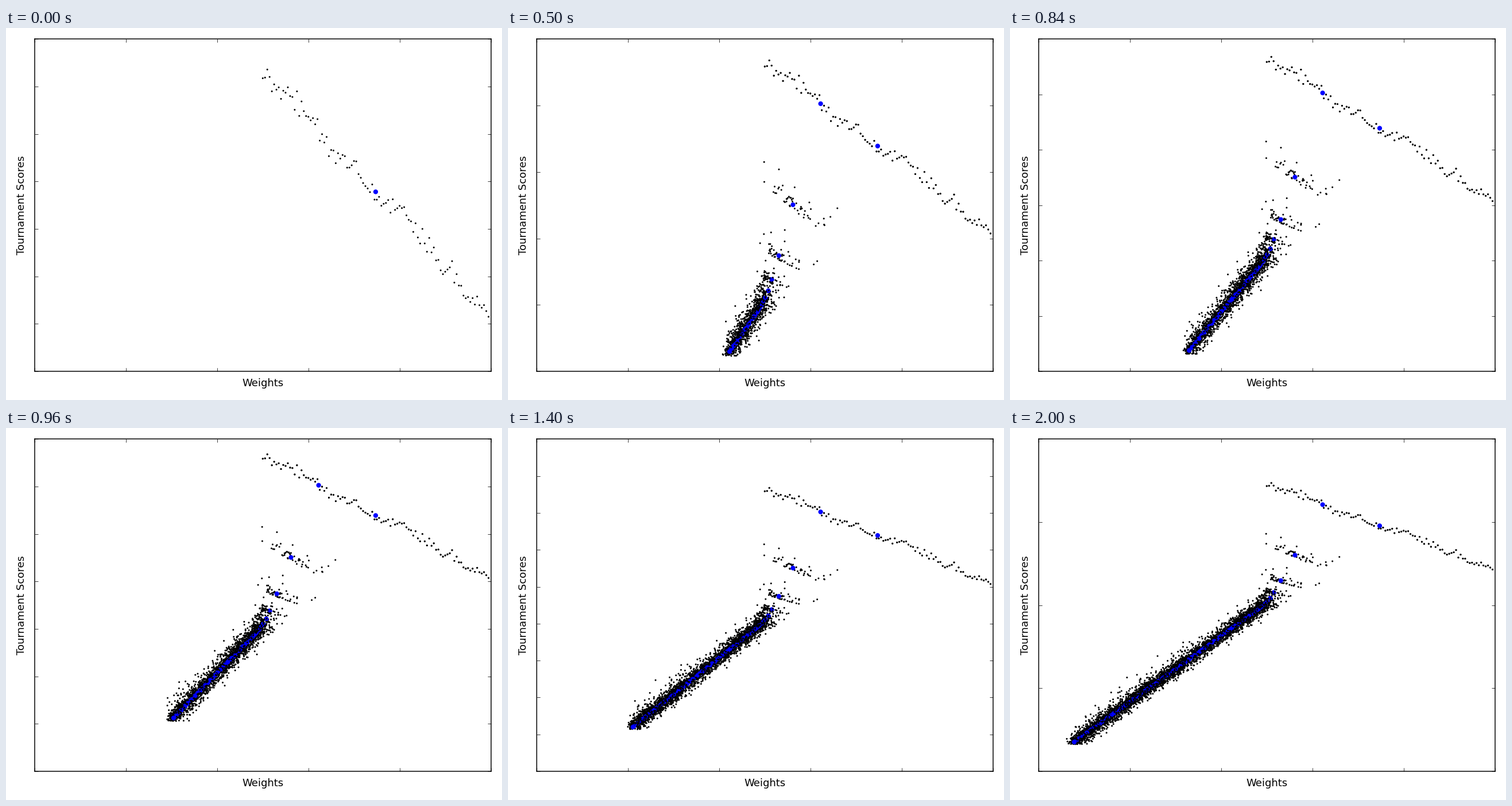
These frames come from a looping animation (864 by 648 pixels, 2020 ms). A matplotlib script:

```python
import math

import matplotlib.pyplot as plt
import numpy as np
from matplotlib.animation import FuncAnimation

W, H, DPI = 864, 648, 108
LEFT, RIGHT, BOTTOM, TOP = 49.94, 844.56, 49.94, 628.56
GENERATIONS = 101
POPULATION = 50

plt.rcParams["font.family"] = "DejaVu Sans"
rng = np.random.default_rng(4)


def first_population():
    """Evenly spaced weights whose scores fall along a bumpy line."""
    weights = .5 + .005 * np.arange(100)
    scores = np.interp(weights, [.5, .6, .665, .705, .74, .81, .85, .995],
                       [7.2, 6.42, 5.5, 5.35, 4.75, 4.4, 3.85, 2.3])
    scores += rng.normal(0, .11, 100)
    scores = 2.15 + 5.21 * (scores - scores.min()) / np.ptp(scores)
    return np.column_stack([weights, scores])


def mean_at(gen):
    """Halves towards 0.5 at first, then drifts down at a steady pace."""
    drift = np.interp(gen, [5, 11, 25, 42, 58, 85, 100],
                      [0, .018, .077, .17, .238, .3526, .422])
    weight = .5 + .2475 / 2 ** gen - drift
    return np.array([weight, 19.8 * weight - 9.78 + 1.67 * .45 ** (gen - 2)])


def offspring(gen):
    spread = .009 + .13 * math.exp(-gen / 1.25)
    slope = -1 - 26 * math.exp(-gen / 2.2)
    drop = .13 + 1.6 * math.exp(-gen / 1.8)
    dx = spread * (rng.gamma(4, 1, POPULATION) - 4) / 2
    dy = slope * dx + rng.exponential(.18, POPULATION) - .13
    dy = np.abs(dy + drop) - drop  # nobody scores below the floor
    return mean_at(gen) + np.column_stack([dx, dy])


def nice_ticks(lo, hi):
    pad = .05 * (hi - lo)
    lo, hi = lo - pad, hi + pad
    for step in (1, 2, 5):
        start = math.floor(lo / step) * step
        if start + 9 * step >= hi:
            break
    return np.arange(start, math.ceil(hi / step) * step + step / 2, step)


first = first_population()
later = range(2, GENERATIONS)
clouds = [first, first] + [offspring(g) for g in later]
means = [first.mean(axis=0), first[:50].mean(axis=0)]
means += [mean_at(g) for g in later]
lows = np.minimum.accumulate([c[:, 1].min() for c in clouds])
best = first[:, 1].max()

# Each generation is its individuals followed by their mean
points = np.vstack([np.vstack(pair) for pair in zip(clouds, means)])
ends = np.cumsum([len(c) + 1 for c in clouds])
sizes = np.full(len(points), 1.0)
sizes[ends - 1] = 20
colors = np.tile([0.0, 0, 0, 1], (len(points), 1))
colors[ends - 1] = 0, 0, 1, 1

fig = plt.figure(figsize=(W / DPI, H / DPI), dpi=DPI, facecolor="white")
ax = fig.add_axes([LEFT / W, BOTTOM / H, (RIGHT - LEFT) / W, (TOP - BOTTOM) / H])
ax.set_xlim(0, 1)
ax.set_xticks(np.arange(0, 1.1, .2))
ax.tick_params(direction="in", length=4, width=.5, top=True, right=True,
               labelleft=False, labelbottom=False)
for spine in ax.spines.values():
    spine.set_linewidth(1)


def label(x, y, text, angle=0):
    fig.text(x / W, y / H, text, fontsize=12, rotation=angle,
             rotation_mode="anchor", ha="center", va="baseline")


label((LEFT + RIGHT) / 2, 23.6, "Weights")
label(32.5, (BOTTOM + TOP) / 2, "Tournament Scores", 90)

dots = ax.scatter(points[:, 0], points[:, 1], s=sizes, c=colors, linewidths=1)


def draw(gen):
    dots.set_offsets(points[:ends[gen]])
    ticks = nice_ticks(lows[gen], best)
    ax.set_yticks(ticks)
    ax.set_ylim(ticks[0], ticks[-1])
    return [dots]


anim = FuncAnimation(fig, draw, frames=GENERATIONS, interval=20,
                     init_func=lambda: draw(0), repeat=True, repeat_delay=0)
plt.show()
```
